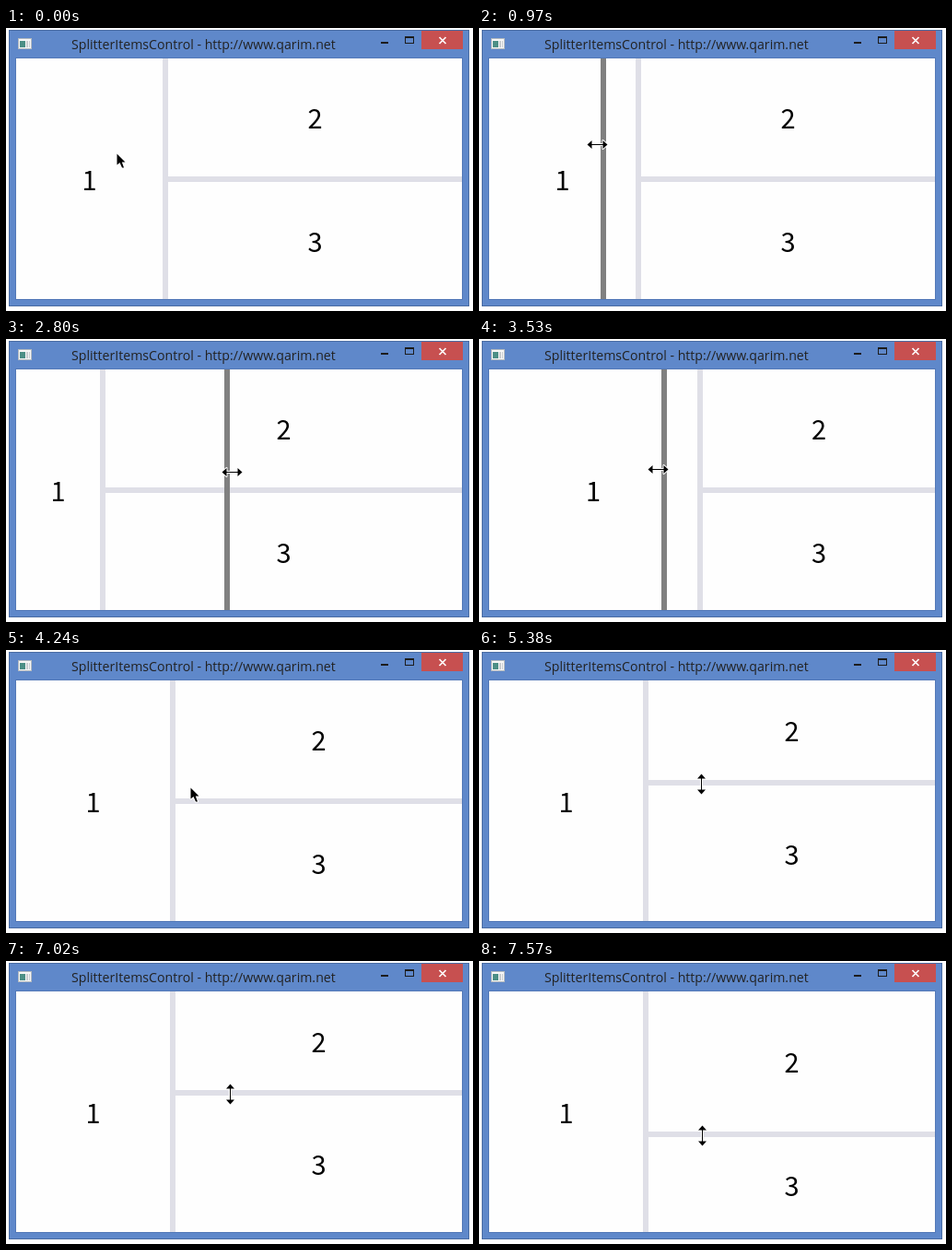
An HTML page for the animation above (8000 ms loop, 507 by 307 pixels).

```html
<!DOCTYPE html>
<html lang="en">
<head>
<meta charset="utf-8">
<title>Splitter demo</title>
<style>
  html, body { margin: 0; width: 100%; height: 100%; overflow: hidden; background: #fff; }
  svg { display: block; width: 507px; height: 307px; }
  .title { font: 14.15px "Open Sans", "Noto Sans", sans-serif; fill: #222; }
  .num { font: 350 29px "Noto Sans CJK JP", "Noto Sans CJK SC", Lato, sans-serif; text-anchor: middle; }
  .bar { fill: #dfdfe7; }
  .cursor { stroke: #fff; stroke-width: 2; paint-order: stroke; stroke-linejoin: round; }
</style>
</head>
<body>
<svg viewBox="0 0 507 307">
  <rect x="3.5" y="2.5" width="499" height="299" fill="#5f88ca" stroke="#4a6ca3"/>
  <rect x="10.5" y="32.5" width="485" height="262" fill="#fefefe" stroke="#5379b8"/>

  <g shape-rendering="crispEdges">
    <path d="M13 11h15v12h-15z" fill="#b4bbc0"/>
    <path d="M14 12h13v10h-13z" fill="#f6f6f6"/>
    <path d="M15 14h6v7h-6z" fill="#4c8f86"/>
    <path d="M22 14h2v7h-2zM25 14h1v7h-1z" fill="#c9cdd0"/>
    <path d="M407 15h8v2h-8z" fill="#1c1c1c"/>
    <path d="M433 9h10v8h-10zM434 11v5h8v-5z" fill="#1c1c1c" fill-rule="evenodd"/>
    <path d="M451 3h45v20h-45z" fill="#c75050"/>
  </g>
  <path d="M470.5 10l7 7m0-7l-7 7" stroke="#fff" stroke-width="1.7"/>
  <text class="title" x="71" y="23">SplitterItemsControl - http://www.qarim.net</text>

  <rect id="vBar" class="bar" y="33" width="6" height="261"/>
  <rect id="hBar" class="bar" height="6"/>
  <text id="n1" class="num">1</text>
  <text id="n2" class="num">2</text>
  <text id="n3" class="num">3</text>
  <rect id="ghost" y="33" width="6" height="261" fill="#808080"/>
  <path id="cursor" class="cursor"/>
</svg>
<script>
const LOOP = 8000;
const LEFT = 11, RIGHT = 495, TOP = 33, BOTTOM = 294, BAR = 6;
const resizeShape = "M-11 0L-6-4.5V-.5H6V-4.5L11 0L6 4.5V.5H-6V4.5Z";
const shapes = {
  arrow: ["M0 0V12L3 9.5L5.5 15H7.5L5.3 9H9Z", 0],
  ew: [resizeShape, 0],
  ns: [resizeShape, 90],
};

const mix = (a, b, p) => Math.round(a + (b - a) * p);
const easeOut = (p, power) => 1 - (1 - p) ** power;

// Each action turns the state before it and its progress into a new state.
const move = (x, y, kind) => (s, p) => ({
  ...s, x: mix(s.x, x, p), y: mix(s.y, y, p), kind: p < 1 ? "arrow" : kind,
});

// Preview drag: the grey bar trails the pointer, the layout jumps on release.
const dragColumn = (v, y, power) => (s, p) => {
  const e = easeOut(p, power), ghost = mix(s.v, v, e), pointer = { y: mix(s.y, y, e) };
  return p < 1
    ? { ...s, ...pointer, ghost, x: ghost + 2 + 6 * Math.sign(v - s.v) }
    : { ...s, ...pointer, v, x: v + 3 };
};

// Live drag: the row bar follows the pointer directly.
const dragRow = (h, x, power) => (s, p) => {
  const row = mix(s.h, h, easeOut(p, power));
  return { ...s, h: row, x: mix(s.x, x, p), y: row + 4 };
};

const first = { v: 170, h: 161, ghost: null, kind: "arrow", x: 120, y: 136 };
// First step, last step, number of steps, action
const acts = [
  [140, 420, 3, move(173, 129, "ew")],
  [830, 1390, 5, dragColumn(102, 123, 1.6)],
  [1950, 2950, 8, dragColumn(237, 144, 2.77)],
  [3260, 3960, 6, dragColumn(178, 140, 1.56)],
  [4240, 4510, 3, move(237, 168, "arrow")],
  [4950, 5100, 2, move(240, 166, "ns")],
  [5380, 5910, 5, dragRow(77, 243, 1.22)],
  [6190, 6190, 1, dragRow(76, 243, 1)],
  [6750, 7570, 7, dragRow(185, 242, 1.6)],
];

function stateAt(time) {
  let state = first;
  for (const [from, to, steps, act] of acts) {
    if (time < from) break;
    const gap = Math.max(1, (to - from) / (steps - 1 || 1));
    const step = Math.floor((time - from) / gap + 0.1) + 1;
    state = act(state, Math.min(1, step / steps));
  }
  return state;
}

const $ = id => document.getElementById(id);
const set = (id, attrs) => Object.entries(attrs).forEach(([k, val]) => $(id).setAttribute(k, val));
const label = (id, x0, x1, y0, y1) =>
  set(id, { x: (x0 + x1) / 2, y: Math.ceil((y0 + y1) / 2) + 12 });

function draw(time) {
  const { v, h, ghost, kind, x, y } = stateAt(time);
  set("vBar", { x: v });
  set("hBar", { x: v + BAR, y: h, width: RIGHT - v - BAR });
  label("n1", LEFT, v, TOP, BOTTOM);
  label("n2", v + BAR, RIGHT, TOP, h);
  label("n3", v + BAR, RIGHT, h + BAR, BOTTOM);
  set("ghost", { x: ghost ?? 0, visibility: ghost === null ? "hidden" : "visible" });
  const [d, angle] = shapes[kind];
  set("cursor", { d, transform: `translate(${x + 0.5} ${y + 0.5}) rotate(${angle})` });
}

const start = performance.now();
function tick() {
  draw((performance.now() - start) % LOOP);
  requestAnimationFrame(tick);
}
tick();
</script>
</body>
</html>
```
